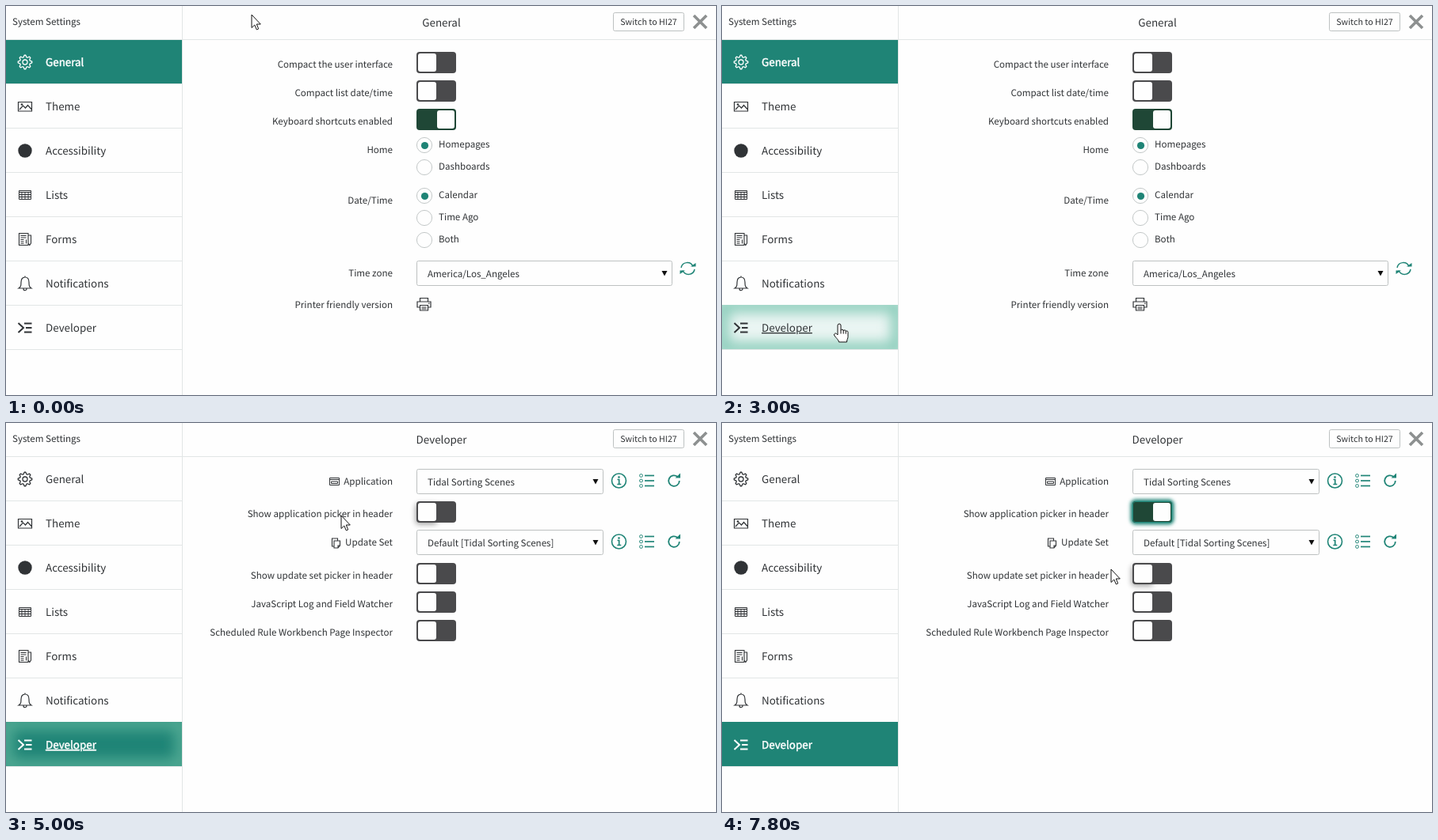
An HTML page for the animation above (8000 ms loop, 896 by 492 pixels).

```html
<!DOCTYPE html>
<html lang="en">
<head>
<meta charset="utf-8">
<title>System Settings</title>
<style>
  html, body { margin: 0; width: 100%; height: 100%; overflow: hidden; background: #fefefe; }
  svg { display: block; width: 100vw; height: 100vh; }
  text {
    font-family: "Noto Sans CJK JP", "Noto Sans CJK SC", "Noto Sans CJK", "Noto Sans", sans-serif;
    font-size: 11.6px; fill: currentColor; text-rendering: geometricPrecision;
  }
  .big { font-size: 13.4px; }
  .small { font-size: 10.7px; }
  .line { fill: none; stroke: currentColor; }
</style>
</head>
<body>
<svg id="stage" viewBox="0 0 896 492" color="#303336"></svg>
<script>
const TEAL = '#1f8476', LOOP = 8000, STEP = 200;
const stage = document.getElementById('stage');

const text = (x, y, s, anchor = 'start', cls = '') =>
  `<text x="${x}" y="${y}" text-anchor="${anchor}" class="${cls}">${s}</text>`;
const label = (y, s) => text(488, y, s, 'end');
const path = (d, w = 1.2, extra = '') =>
  `<path class="line" d="${d}" stroke-width="${w}" ${extra}/>`;
const solid = d => `<path d="${d}" fill="currentColor"/>`;
const at = (x, y, s) => `<g transform="translate(${x} ${y})">${s}</g>`;
const box = (x, y, w, h, fill, rx = 0, extra = '') =>
  `<rect x="${x}" y="${y}" width="${w}" height="${h}" rx="${rx}" fill="${fill}" ${extra}/>`;

function toggle(y, on, id = '') {
  const color = on ? '#1f4736' : '#4a4a4c';
  const shade = id ? box(517, y + 3, 27, 26, '#000', 4, `id="${id}" opacity=".38" filter="url(#soft)"`) : '';
  return shade + box(518, y, 50, 27, color, 4) + box(on ? 544 : 520, y + 2, on ? 22 : 23, 23, '#fefefe', 3);
}

function radio(y, name, on) {
  const dot = on ? `<circle cx="528.5" cy="${y + .5}" r="4.6" fill="${TEAL}"/>` : '';
  return `<circle cx="528" cy="${y}" r="9.6" fill="#fefefe" stroke="#c3c8c8"/>` + dot + text(546, y + 3, name);
}

function select(y, w, value) {
  const x = 518 + w;
  return box(518.5, y + .5, w - 1, 31, '#fefefe', 2, 'stroke="#bdc1c1"') + text(532, y + 21, value) +
    `<path d="M${x - 13.5} ${y + 13}h7l-3.5 6.500z" fill="#111"/>`;
}

function gear() {
  let d = '';
  for (let i = 0; i < 32; i++) {
    const a = (i - .5) * Math.PI / 16, r = i % 4 < 2 ? 8.8 : 6.5;
    d += `${i ? 'L' : 'M'}${(r * Math.cos(a)).toFixed(2)} ${(r * Math.sin(a)).toFixed(2)}`;
  }
  return path(d + 'z', 1.3, 'stroke-linejoin="round"') + '<circle class="line" r="3" stroke-width="1.3"/>';
}

const items = [
  ['General', gear()],
  ['Theme', path('M-8.500-5.500h17v11.500h-17zM-7 4l4.500-5 3 3 3-3.500 5 5.500') + '<circle cx="-4" cy="-2.500" r="1.300" fill="currentColor"/>'],
  ['Accessibility', '<circle r="8.700" fill="currentColor"/>'],
  ['Lists', path('M-7.500-5.500h15v11h-15zM-7.500-3.500h15M-7.500-.5h15M-7.500 2.500h15M-4-3.500v9M0-3.500v9M4-3.500v9', 1)],
  ['Forms', path('M-7.500-7.500h11.500v15h-11.500zM-5.500-4.500h7M-5.500-2h7M-5.500 .5h4M-5.500 3h4M-5.500 5.300h4M4-5h3.500v10l-1.700 2.500-1.800-2.500M1.500 .5v5', 1.1)],
  ['Notifications', path('M-8 6c3-2 3-4 3-7.500c0-4 2-6.500 5-6.500s5 2.500 5 6.500c0 3.500 0 5.500 3 7.500zM-2 6.500c0 3 4 3 4 0M0-8v-1.500', 1.2)],
  ['Developer', path('M-8.500-6l6.500 6-6.500 6M-1-5.500h9.500M1 0h7.500M-1 5.500h9.500', 2)]
];

const sidebar = items.map(([name, icon], i) => {
  const y = 43 + 56 * i;
  return `<g class="item">${box(0, y - 1, 222, 56, 'none')}` +
    `<rect class="inner" x="0" y="${y}" width="222" height="55" fill="none" stroke-width="18" filter="url(#edge)" clip-path="url(#clip${i})"/>` +
    at(24, y + 28, icon) + text(50, y + 33, name, 'start', 'big') +
    `<path d="M0 ${y + 55.5}h222" stroke="#e2e6e6"/></g>`;
}).join('');
const clips = items.map((_, i) => `<clipPath id="clip${i}">${box(0, 42 + 56 * i, 222, 56, '#000')}</clipPath>`).join('');

const sync = path('M-8.500-1c1.500-8 12-8.500 15-1.500M8.500 1c-1.500 8-12 8.500-15 1.500', 1.5) +
  solid('M3.500-2.500h6.500v-4.500zM-3.500 2.500h-6.500v4.500z');
const printer = path('M-5-3v-4.500h10v4.500M-5 4h-3.500v-7h17v7h-3.500M-5 1.500h10v6.500h-10zM-3 4h6M-3 6h6M5.500-.8h1.500', 1.2);

const tools = y => `<g color="${TEAL}">` +
  at(773.5, y, '<circle class="line" r="9" stroke-width="1.600"/>' + path('M-2-1.500h2.200v6M-2.200 4.500h5', 1.7) +
    '<circle cy="-4.500" r="1.300" fill="currentColor"/>') +
  at(808, y, [-6.5, 0, 6.5].map(d => `<circle class="line" cx="-6.500" cy="${d}" r="1.900"/>` + path(`M-2 ${d}h12`, 1.7)).join('')) +
  at(843, y, path('M4.500-5a6.800 6.800 0 1 0 2.300 5', 1.8) + solid('M1.500-3.500h6.500v-6z')) + '</g>';

const windowIcon = path('M-6-4.500h12v9h-12zM-6-2.500h12M-4 0h8v2.500h-8z', 1);
const copyIcon = path('M-2.500-3h7.500v6l-2.500 3h-5zM-2.500 4h-2.500v-10h7v3M5 3h-2.500v3', 1.1);

const general = text(549.5, 26, 'General', 'middle', 'big') +
  label(78, 'Compact the user interface') + toggle(58, false) +
  label(114, 'Compact list date/time') + toggle(94, false) +
  label(150, 'Keyboard shortcuts enabled') + toggle(130, true) +
  label(186, 'Home') + radio(176, 'Homepages', true) + radio(204, 'Dashboards') +
  label(250, 'Date/Time') + radio(240, 'Calendar', true) + radio(268, 'Time Ago') + radio(296, 'Both') +
  label(342, 'Time zone') + select(322, 323, 'America/Los_Angeles') +
  `<g color="${TEAL}">${at(860.5, 332, sync)}</g>` +
  label(382, 'Printer friendly version') + at(527.5, 377, printer);

const developer = text(549.5, 26, 'Developer', 'middle', 'big') +
  at(414.5, 74, windowIcon) + label(78, 'Application') + select(58, 236, 'Tidal Sorting Scenes') + tools(73) +
  label(119, 'Show application picker in header') + `<g id="off">${toggle(99, false, 'shade1')}</g>` +
  `<g id="on">${box(517, 98, 52, 29, TEAL, 5, `stroke="${TEAL}" stroke-width="3" filter="url(#glow)"`)}` +
  `${toggle(99, true)}${box(518.5, 99.5, 49, 26, 'none', 3.5, `stroke="${TEAL}"`)}</g>` +
  at(416.5, 152, copyIcon) + label(155, 'Update Set') + select(135, 236, 'Default [Tidal Sorting Scenes]') + tools(150) +
  label(197, 'Show update set picker in header') + toggle(177, false, 'shade2') +
  label(233, 'JavaScript Log and Field Watcher') + toggle(213, false) +
  label(269, 'Scheduled Rule Workbench Page Inspector') + toggle(249, false);

const blur = (id, n) => `<filter id="${id}" x="-50%" y="-50%" width="200%" height="200%"><feGaussianBlur stdDeviation="${n}"/></filter>`;

stage.innerHTML = `<defs>${blur('soft', 3.5)}${blur('edge', 8)}${blur('glow', 2.2)}${clips}</defs>` +
  box(0, 0, 896, 492, '#fefefe') + sidebar +
  '<path d="M0 42.500h896M222.500 0v492" stroke="#e2e6e6"/>' +
  text(8, 24, 'System Settings') +
  box(766.5, 8.5, 89, 23, '#fefefe', 2, 'stroke="#bdc1c1"') + text(811, 24, 'Switch to HI27', 'middle', 'small') +
  '<path d="M868 12l16 16M884 12l-16 16" stroke="#8d9090" stroke-width="3.600"/>' +
  `<g id="general">${general}</g><g id="developer">${developer}</g>` +
  '<path id="cursor" fill="#fff" stroke="#111" stroke-linejoin="round"/>';

const $ = id => document.getElementById(id);
const show = (id, on) => $(id).setAttribute('display', on ? 'inline' : 'none');
const rows = [...stage.querySelectorAll('.item')].map(g => ({
  g, back: g.firstChild, inner: g.querySelector('.inner'), name: g.querySelector('text')
}));

const ARROW = 'M0 0V16.500L3.800 13L6.300 18.900L8.700 17.900L6.300 12H11.300Z';
const HAND = 'M-2 14V2a2 2 0 0 1 4 0v6.500a1.600 1.600 0 0 1 3.200 .6a1.500 1.500 0 0 1 3 .6a1.500 1.500 0 0 1 2.800 .8v6' +
  'c0 2-1.500 3.500-1.500 6.500H-.5c0-2.500-5-6.500-6-9a1.800 1.800 0 0 1 3-1.500zM2 8.500v4M5.200 9.100v3.500M8.200 9.700v3';

// Pointer route: time, x, y
const route = [
  [0, 310, 11], [400, 303, 20], [800, 215, 62], [1200, 150, 106], [1600, 139, 205], [2000, 136, 302],
  [2400, 146, 369], [2600, 148, 398], [2800, 148, 402], [3600, 148, 402], [3800, 165, 385], [4200, 270, 270],
  [4600, 385, 150], [5000, 423, 117], [5400, 455, 115], [5800, 525, 115], [6800, 525, 115],
  [7400, 500, 165], [7800, 491, 185], [LOOP, 491, 185]
];

function pointer(t) {
  const i = route.findIndex(k => k[0] > t);
  const [t0, x0, y0] = route[i - 1], [t1, x1, y1] = route[i];
  const k = (t - t0) / (t1 - t0);
  return [Math.round(x0 + (x1 - x0) * k), Math.round(y0 + (y1 - y0) * k)];
}

function render(ms) {
  const t = Math.floor(ms % LOOP / STEP) * STEP;
  const [x, y] = pointer(t);
  const dev = t >= 3200, focus = t >= 3000 && t < 6000, on = t >= 6200;
  const inSide = x < 222 && y > 43 && y < 434;

  show('general', !dev);
  show('developer', dev);
  show('on', on);
  show('off', !on);
  show('shade1', x > 300 && y > 96 && y < 132);
  show('shade2', x > 300 && y > 174 && y < 210);

  rows.forEach((r, i) => {
    const active = i === (dev ? 6 : 0), focused = focus && i === 6;
    const hover = inSide && Math.floor((y - 42) / 56) === i;
    r.back.setAttribute('fill', active ? TEAL : hover || focused ? '#ebf5f3' : 'none');
    r.inner.setAttribute('stroke', focused ? (active ? '#4fa993' : '#8fcfbd') : 'none');
    r.g.setAttribute('color', active ? '#fff' : '#303336');
    r.name.setAttribute('stroke', active ? '#fff' : 'none');
    r.name.setAttribute('stroke-width', .45);
    r.name.setAttribute('text-decoration', focused ? 'underline' : 'none');
  });

  $('cursor').setAttribute('d', inSide ? HAND : ARROW);
  $('cursor').setAttribute('transform', `translate(${x} ${y})`);
}

const start = performance.now();
function tick() {
  render(performance.now() - start);
  requestAnimationFrame(tick);
}
render(0);
requestAnimationFrame(tick);
</script>
</body>
</html>
```
